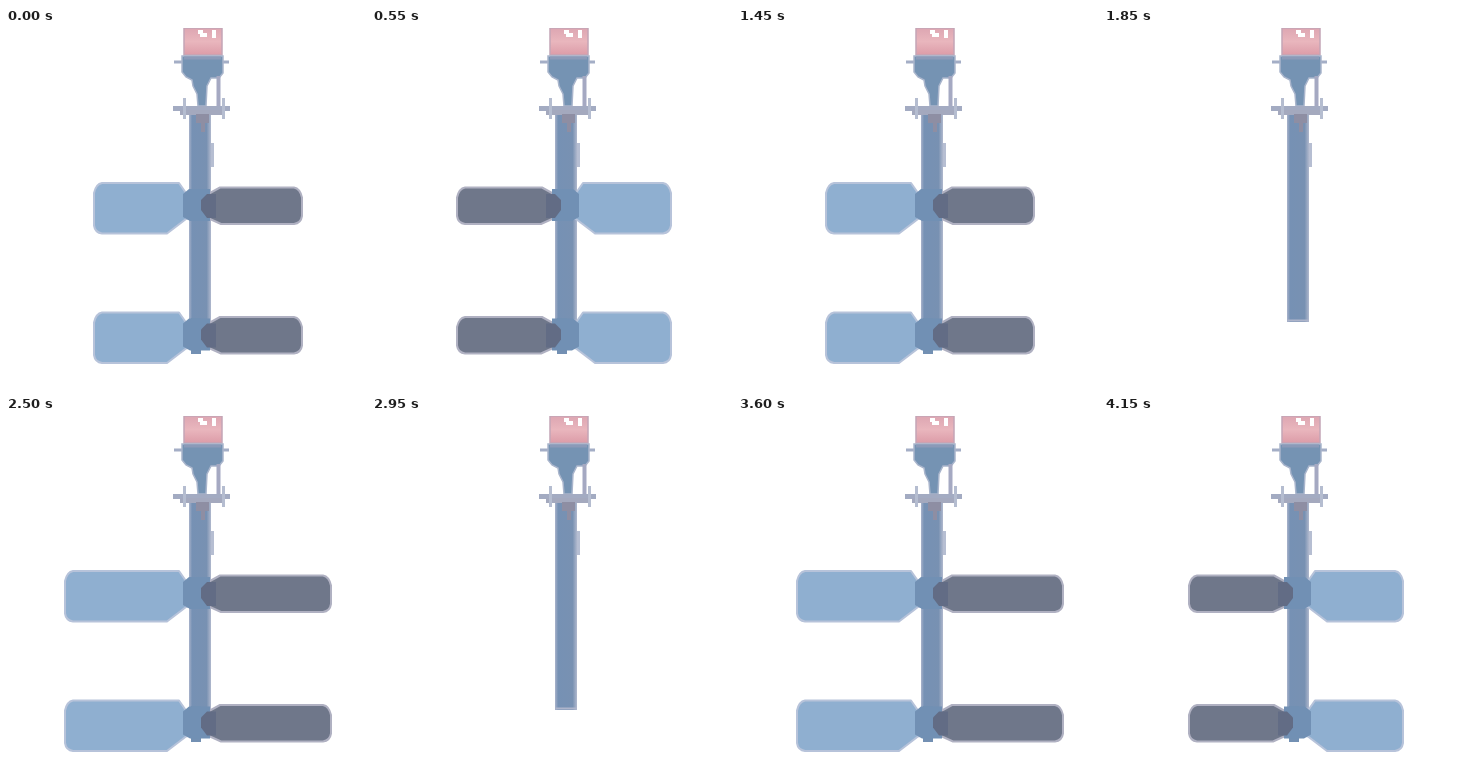
Recreate the animation shown at these times as an HTML page. Size 360 by 360 pixels, loop 4200 ms.

```html
<!DOCTYPE html>
<html lang="en">
<head>
<meta charset="utf-8">
<title>Stirrer</title>
<style>
  html, body { margin: 0; width: 100%; height: 100%; overflow: hidden; background: #fff; }
  svg { display: block; width: 360px; height: 360px; }
</style>
</head>
<body>
<svg viewBox="0 0 360 360">
  <defs>
    <linearGradient id="steel">
      <stop offset="0" stop-color="#a9b3cb"/>
      <stop offset=".14" stop-color="#7691b4"/>
      <stop offset=".8" stop-color="#7891b2"/>
      <stop offset="1" stop-color="#b0b8cd"/>
    </linearGradient>
    <linearGradient id="pink" x2="0" y2="1">
      <stop offset="0" stop-color="#dda6b2"/>
      <stop offset=".5" stop-color="#e9b6bd"/>
      <stop offset="1" stop-color="#dc9ca8"/>
    </linearGradient>
  </defs>

  <!-- motor -->
  <path d="M178 0H216V27H178Z" fill="url(#pink)" stroke="#c3a5b6" stroke-width="1.5"/>
  <path d="M192 2h5v3h4v4h-7v-3h-2zM206 2h4v8h-4z" fill="#fff"/>
  <path d="M168 34H223" stroke="#a4aec6" stroke-width="3"/>
  <path d="M176 28H217V45L213 50H205L201 58L200 78H192L191 66L187 58L186 52L180 49L176 44Z" fill="#7593b3" stroke="#a9b5cc" stroke-width="1.5"/>
  <path d="M178 30H215" stroke="#8b9ab8" stroke-width="3"/>
  <path d="M212.500 48V78" stroke="#a5a9c2" stroke-width="4"/>

  <!-- shaft and flange -->
  <rect x="183" y="84" width="22" height="210" fill="url(#steel)"/>
  <path d="M183.500 292.500H205" stroke="#aeb5cb" stroke-width="2"/>
  <path d="M206.500 115V139" stroke="#b6bed2" stroke-width="3"/>
  <path d="M167 80.500H224" stroke="#a3abc2" stroke-width="5"/>
  <path d="M174 84.500H217" stroke="#a4a9be" stroke-width="5"/>
  <path d="M178.500 70V91M217.500 70V91" stroke="#b5bdd0" stroke-width="3"/>
  <path d="M190 86H203V95H199V104H195V95H190Z" fill="#8e8ea3"/>

  <g id="blades" stroke-width="2" stroke-linejoin="round"></g>
</svg>
<script>
const CX = 192, TICK = 50, LOOP = 4200, IMAGE = 40;
// Signed reach of the near blade through half a turn; null hides the impellers.
const REACH = [-105, null, 12, 56, 108, 134, 152, -155, -134];
const LIGHT = { top: 155, bottom: 205.500, upper: 19, lower: 31, fill: '#8fafd0', edge: '#b7c3da' };
const DARK = { top: 159.500, bottom: 196, upper: 22, lower: 23, fill: '#6f778a', edge: '#b0b1c2' };
const group = document.getElementById('blades');

function blade(side, reach, look, dy) {
  const end = Math.max(reach - 1, 8);
  const cut = Math.min(8, end * .25);
  const p = (x, y) => `${(CX + side * x).toFixed(1)} ${(y + dy).toFixed(1)}`;
  const { top, bottom } = look;
  const upper = Math.min(look.upper, end * .5), lower = Math.min(look.lower, end * .5);
  const neck = Math.min(12, end * .25);
  const d = `M${p(0, 167)}L${p(neck, 165)}L${p(upper, top)}L${p(end - cut, top)}` +
    `Q${p(end - 2, top + 1)} ${p(end, top + cut + 2)}L${p(end, bottom - cut)}` +
    `Q${p(end - 1, bottom - 1)} ${p(end - cut, bottom)}L${p(lower, bottom)}` +
    `L${p(neck, 191)}L${p(0, 188)}Z`;
  return `<path d="${d}" fill="${look.fill}" stroke="${look.edge}"/>`;
}

function impeller(reach, dy) {
  const side = Math.sign(reach), size = Math.abs(reach);
  const p = (x, y) => `${CX - side * x} ${y + dy}`;
  return blade(side, size, LIGHT, dy) + blade(-side, size, DARK, dy) +
    `<path d="M${p(-15, 166)}L${p(-9, 161)}L${p(12, 161)}L${p(12, 193)}L${p(-8, 193)}L${p(-15, 189)}Z" fill="#7190b4"/>` +
    `<path d="M${p(18, 166)}L${p(9, 166)}L${p(3, 172)}L${p(3, 182)}L${p(9, 190)}L${p(18, 190)}Z" fill="#626c85"/>`;
}

function assembly(reach) {
  if (reach === null) return '';
  return '<rect x="185" y="290" width="10" height="36" fill="#7390b3"/>' +
    impeller(reach, 0) + impeller(reach, 129.500);
}

const poses = REACH.map(assembly);
let shown = -1;

function draw(now) {
  const time = Math.floor((now % LOOP) / TICK) * TICK;
  const pose = Math.max(0, Math.floor((time - 1) / IMAGE)) % poses.length;
  if (pose !== shown) {
    group.innerHTML = poses[pose];
    shown = pose;
  }
}

const start = performance.now();
function tick() {
  draw(performance.now() - start);
  requestAnimationFrame(tick);
}
tick();
</script>
</body>
</html>
```
